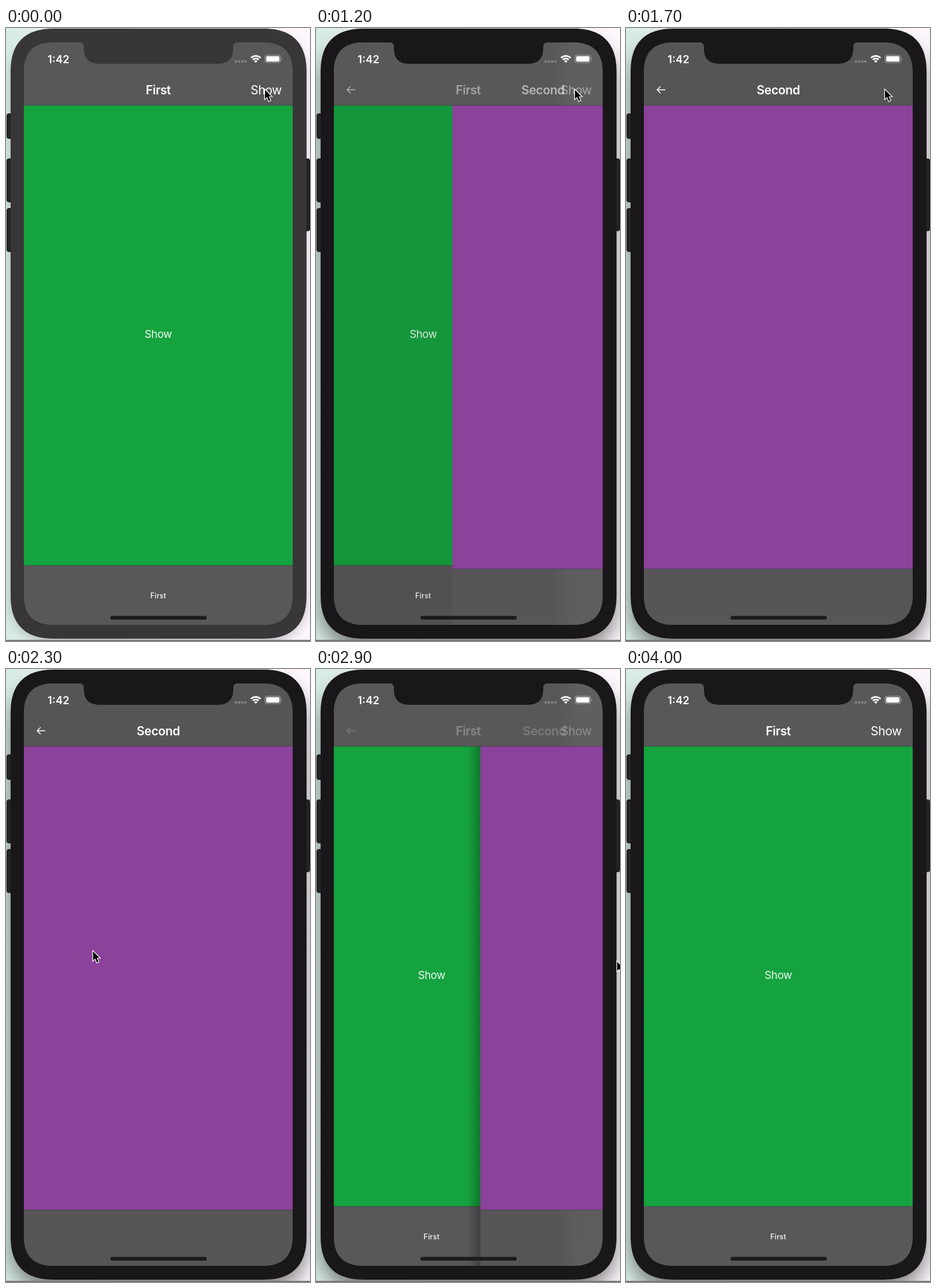
Write an HTML page that moves like this. It is 527 by 1062 pixels and loops after 4.1 s.

```html
<!DOCTYPE html>
<html lang="en">
<head>
<meta charset="utf-8">
<title>Navigation transition</title>
<style>
  html, body { margin: 0; width: 100%; height: 100%; overflow: hidden; }
  body { position: relative; background: linear-gradient(90deg, #d5ebe2 0, #eef2f2 15%, #fdf7fd 85%); }
  #shadow { position: absolute; left: 8px; top: 1px; width: 513px; height: 1057px; border-radius: 74px; }
  #shadow.idle { box-shadow: 0 10px 20px rgba(0, 0, 0, .22); }
  #shadow.active { box-shadow: 0 22px 34px rgba(0, 0, 0, .48); }
  svg { position: absolute; left: 0; top: 0; display: block; }
  text { font-family: Inter, "Open Sans", sans-serif; fill: #fff; text-anchor: middle; }
  .title { font-size: 21.1px; font-weight: 600; letter-spacing: -.4px; }
  .action { font-size: 21.1px; letter-spacing: -.4px; }
  .label { font-size: 18.6px; letter-spacing: -.4px; fill-opacity: .93; }
  .tab { font-size: 12.4px; font-weight: 500; letter-spacing: .3px; }
  .clock { font-size: 18.6px; font-weight: 600; }
</style>
</head>
<body>
<div id="shadow"></div>
<svg width="527" height="1062" viewBox="0 0 527 1062">
  <defs>
    <clipPath id="display">
      <path d="M83 25H127Q135 25 135 33V36C135 54 145 62 161 62H368C384 62 394 54 394 36V33Q394 25 402 25H445C480 25 497 42 497 77V982C497 1017 480 1034 445 1034H83C48 1034 31 1017 31 982V77C31 42 48 25 83 25Z"/>
    </clipPath>
    <linearGradient id="edge">
      <stop offset="0" stop-color="#000" stop-opacity="0"/>
      <stop offset="1" stop-color="#000" stop-opacity=".6"/>
    </linearGradient>
    <linearGradient id="sheen" gradientUnits="userSpaceOnUse" x1="0" y1="0" x2="36" y2="0">
      <stop offset="0" stop-color="#fff" stop-opacity="0"/>
      <stop offset="1" stop-color="#fff" stop-opacity=".045"/>
    </linearGradient>
  </defs>

  <rect y="1060" width="527" height="2" fill="#77757b"/>
  <g fill="#242427" stroke="#151517">
    <rect x="1.5" y="148.5" width="12" height="43" rx="3"/>
    <rect x="1.5" y="226.5" width="12" height="75" rx="3"/>
    <rect x="1.5" y="312.5" width="12" height="75" rx="3"/>
    <rect x="514" y="226.5" width="12.5" height="125" rx="3"/>
  </g>
  <path id="shell" d="M82 1H447C496 1 521 26 521 75V984C521 1033 496 1058 447 1058H82C33 1058 8 1033 8 984V75C8 26 33 1 82 1Z"/>

  <g clip-path="url(#display)">
    <rect x="31" y="25" width="466" height="1009" fill="#595759"/>
    <g id="first">
      <rect x="31" y="134" width="466" height="797" fill="#15a33f"/>
      <rect x="31" y="931" width="466" height="103" fill="#595759"/>
      <rect x="31" y="930.5" width="466" height="1" fill-opacity=".25"/>
      <text class="label" x="264" y="536.5">Show</text>
      <text class="tab" x="264" y="988">First</text>
    </g>
    <rect id="dim" x="31" y="134" width="466" height="900"/>
    <g id="second">
      <rect id="cast" x="8" y="134" width="23" height="900" fill="url(#edge)"/>
      <rect x="31" y="134" width="466" height="803" fill="#8b429b"/>
      <rect x="31" y="937" width="466" height="97" fill="#575557"/>
      <rect x="31" y="936.5" width="466" height="1" fill-opacity=".25"/>
    </g>
    <rect id="bar" x="31" y="25" width="466" height="109"/>
    <rect x="31" y="133.6" width="466" height="1" fill-opacity=".28"/>
    <g id="glow" fill="url(#sheen)">
      <rect y="25" width="200" height="109"/>
      <rect y="937" width="200" height="97"/>
    </g>

    <text id="firstTitle" class="title" x="264" y="115">First</text>
    <text id="action" class="action" x="451" y="114.5">Show</text>
    <text id="secondTitle" class="title" x="264" y="115">Second</text>
    <path id="back" d="M68 107H54M60 101l-6 6 6 6" fill="none" stroke="#fff" stroke-width="1.5"/>

    <text class="clock" x="91" y="60.5">1:42</text>
    <g fill="#807e80">
      <circle cx="398.5" cy="58" r="2.3"/><circle cx="404" cy="58" r="2.3"/>
      <circle cx="409.5" cy="58" r="2.3"/><circle cx="415" cy="58" r="2.3"/>
    </g>
    <g fill="none" stroke="#fff" stroke-width="2.8">
      <path d="M424.7 51.7A11.8 11.8 0 0 1 441.3 51.7M428 55A7.1 7.1 0 0 1 438 55"/>
      <path d="M433 60l-2.6-2.6A3.7 3.7 0 0 1 435.6 57.4Z" fill="#fff" stroke-width=".5"/>
    </g>
    <rect x="449.2" y="47" width="26.6" height="13" rx="3.5" fill="none" stroke="#a8a7a8" stroke-width="1.1"/>
    <rect x="451" y="48.8" width="23" height="9.4" rx="2" fill="#fff"/>
    <path d="M477.4 51.5Q480 53.5 477.4 55.6Z" fill="#a8a7a8"/>
    <rect x="181" y="1018.5" width="167" height="6.4" rx="3.2" fill="#1d1b1d"/>
  </g>

  <path id="cursor" d="M1 2.2V17.8L4.6 14.4 7.6 21.6 10.4 20.4 7.4 13.4H12.2Z" stroke="#fff" stroke-width="2.4" paint-order="stroke"/>
</svg>
<script>
const LOOP = 4100, STEP = 100, WIDTH = 466;
const el = id => document.getElementById(id);
const set = (id, attrs) => {
  for (const name in attrs) el(id).setAttribute(name, attrs[name]);
};
const shift = x => `translate(${x})`;

// [time, x, y]
const cursorPath = [
  [0, 448, 105], [1800, 405, 180], [1900, 295, 325], [2000, 190, 430],
  [2100, 141, 476], [2200, 146, 482], [2300, 150, 487], [2500, 180, 490],
  [2600, 250, 496], [2700, 338, 499], [2800, 435, 502], [2900, 521, 505], [3000, 560, 505]
];
// [time, distance the second page has been dragged]
const dragPath = [[2500, 0], [2600, 2], [2700, 72], [2800, 168], [2900, 254], [3000, 462], [3100, WIDTH]];

const stepAt = (table, t) => table.findLast(row => row[0] <= t);

function pushProgress(t) {
  if (t < 1100) return 0;
  if (t >= 1500) return 1;
  const phase = (t - 1075) * .015;
  return 1 - (1 + phase) * Math.exp(-phase);
}

function draw(t) {
  const popping = t >= 2500;
  const offset = popping ? stepAt(dragPath, t)[1] : WIDTH * (1 - pushProgress(t));
  const shown = 1 - offset / WIDTH;
  const moving = shown > 0 && shown < 1;
  const fadeIn = popping ? shown ** 2 : shown;
  const fadeOut = popping ? (1 - shown) ** 2 : 1 - shown;

  el('shadow').className = t < 1100 ? 'idle' : 'active';
  set('shell', { fill: t < 1100 ? '#383638' : '#19171a' });
  set('first', { transform: shift(-.3 * WIDTH * shown) });
  set('dim', { opacity: popping ? 0 : .13 * shown });
  set('second', { transform: shift(offset), visibility: shown ? 'visible' : 'hidden' });
  set('cast', { opacity: popping ? shown : 0 });
  set('bar', { fill: shown === 1 ? '#565456' : '#595759' });
  set('glow', { transform: shift(355 + offset / 4), opacity: moving ? 1 : 0 });

  set('firstTitle', { opacity: fadeOut });
  set('action', { opacity: fadeOut });
  set('secondTitle', { opacity: fadeIn, transform: shift(offset * (popping ? .52 : .63)) });
  set('back', { opacity: fadeIn });

  const [, x, y] = stepAt(cursorPath, t);
  set('cursor', { transform: `translate(${x} ${y})` });
}

const start = performance.now();
function tick() {
  const t = (performance.now() - start) % LOOP;
  draw(Math.floor(t / STEP) * STEP);
  requestAnimationFrame(tick);
}
tick();
</script>
</body>
</html>
```
